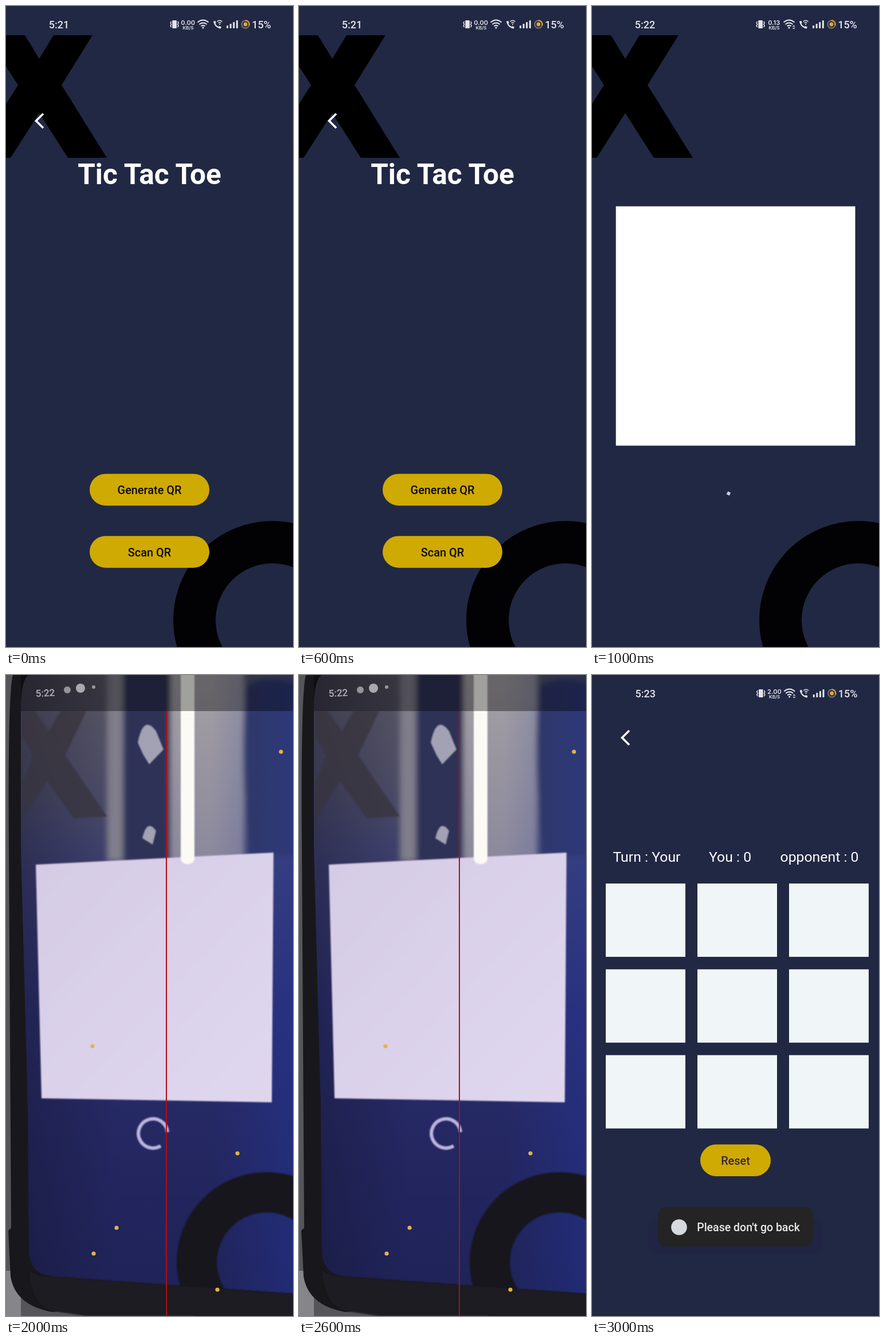
An HTML page for the animation above (4000 ms loop, 501x1119 px).

```html
<!DOCTYPE html>
<html lang="en">
<head>
<meta charset="utf-8">
<title>Tic Tac Toe</title>
<style>
  html, body { margin: 0; width: 100%; height: 100%; overflow: hidden; background: #212844; }
  svg { display: block; font-family: Roboto, sans-serif; }
  .line { fill: none; stroke: #e4e5ea; stroke-width: 2; }
  .mid { text-anchor: middle; }
  .rate { font-family: Inter, sans-serif; font-weight: 600; text-anchor: middle; }
</style>
</head>
<body>
<svg id="stage" width="501" height="1119" viewBox="0 0 501 1119">
  <defs>
    <linearGradient id="screen" x2="0" y2="1">
      <stop offset="0" stop-color="#5c5a64"/>
      <stop offset=".2" stop-color="#4c4c69"/>
      <stop offset=".32" stop-color="#3b3e70"/>
      <stop offset=".55" stop-color="#292d6c"/>
      <stop offset=".8" stop-color="#23265f"/>
      <stop offset="1" stop-color="#1f2358"/>
    </linearGradient>
    <linearGradient id="side">
      <stop offset="0" stop-color="#14142c" stop-opacity=".4"/>
      <stop offset=".35" stop-color="#14142c" stop-opacity="0"/>
      <stop offset=".7" stop-color="#2438a0" stop-opacity="0"/>
      <stop offset="1" stop-color="#2438a0" stop-opacity=".4"/>
    </linearGradient>
    <linearGradient id="glare" x2="0" y2="1">
      <stop offset="0" stop-color="#a5a1a4"/>
      <stop offset="1" stop-color="#8b889c"/>
    </linearGradient>
    <linearGradient id="paper" x2="1" y2="1">
      <stop offset="0" stop-color="#d5cbe5"/>
      <stop offset="1" stop-color="#e0d7ef"/>
    </linearGradient>
    <filter id="soft"><feGaussianBlur stdDeviation="5"/></filter>
    <filter id="crisp"><feGaussianBlur stdDeviation=".8"/></filter>
  </defs>
</svg>
<script>
const stage = document.getElementById('stage');
const HOLD = 1000;

const rect = (x, y, w, h, fill, r = 0) =>
  `<rect x="${x}" y="${y}" width="${w}" height="${h}" rx="${r}" fill="${fill}"/>`;
const dot = (x, y, r, fill) => `<circle cx="${x}" cy="${y}" r="${r}" fill="${fill}"/>`;
const label = (text, x, y, size, fill, weight = 400, cls = 'mid') =>
  `<text x="${x}" y="${y}" font-size="${size}" fill="${fill}" font-weight="${weight}" class="${cls}">${text}</text>`;
const line = (d, width = 2) => `<path class="line" d="${d}" style="stroke-width:${width}"/>`;
const button = (text, x, y, w, ink = '#0c0a08') =>
  rect(x, y, w, 55.5, '#cfaa03', 27.75) + label(text, x + w / 2, y + 35.3, 19.9, ink, 500);
const back = y =>
  `<path d="M65 ${y - 12.5}L52.5 ${y}L65 ${y + 12.5}" fill="none" stroke="#fff" stroke-width="3.6"/>`;

const backdrop = `
  <path d="M-35 51H33L58 92L83 51H151L97 138L176 265H108L58 187L8 265H-60L21 138Z"/>
  <circle cx="465" cy="1072" r="136" fill="none" stroke="#020204" stroke-width="74"/>`;

function statusBar(time, rate, traffic, shift = 0) {
  const ink = '#e4e5ea';
  const bars = [0, 1, 2, 3].map(i => rect(385 + i * 5.6, 34 - i * 3, 3, 5 + i * 3, ink, 1)).join('');
  return `<g transform="translate(${shift})">
    ${label(time, 92.5, 39, 18, ink, 500)}
    ${rect(290.3, 25, 7.6, 14, ink, 1)}
    ${line('M288.6 27l-1.6 2.5 1.6 2.5-1.6 2.5 1.6 2.5M299.6 27l1.6 2.5-1.6 2.5 1.6 2.5-1.6 2.5', 1.4)}
    ${label(rate, 317.7, 33, 11, ink, 600, 'rate')}
    ${label('KB/S', 318, 41, 8, ink, 600, 'rate')}
    ${line('M334.5 28.5Q344 20.5 353.5 28.5M337.5 32Q344 26.8 350.5 32M340.5 35.3Q344 32.4 347.5 35.3')}
    ${dot(344, 38, 1.6, ink)}
    ${traffic ? line('M350.5 36l1.7-1.7 1.7 1.7M350.5 38l1.7 1.7 1.7-1.7', 1.2) : ''}
    ${line('M363.6 26.5C363.8 33 368 37.8 375 38', 2.2)}
    ${line('M363.8 26.5l1.2 4M371.3 36.8l4 1.2', 3.6)}
    ${line('M368.5 27.3Q373 23 377.5 27.3M370.6 29.8Q373 27.6 375.4 29.8', 1.4)}
    ${dot(373, 32, 1.1, ink)}
    ${bars}
    <circle cx="418" cy="32" r="6.6" fill="none" stroke="#77716b" stroke-width="2.2"/>
    <path d="M418 25.4A6.6 6.6 0 0 1 424.3 34" fill="none" stroke="#d69a35" stroke-width="2.2"/>
    ${dot(418, 32, 3.4, '#e3a936')}
    ${label('15%', 446, 39, 18, ink, 500)}
  </g>`;
}

const menu = () => backdrop + statusBar('5:21', '0.00', false) + back(200.5) +
  label('Tic Tac Toe', 250.5, 311, 49.5, '#fff', 700) +
  button('Generate QR', 146, 816.7, 209) + button('Scan QR', 146, 925.2, 209);

const share = () => backdrop + statusBar('5:22', '0.13', true) +
  rect(41.7, 349.7, 417.8, 417.8, '#fff') +
  `<g transform="rotate(28 238.5 851)">${rect(235.7, 848.2, 5.6, 5.6, '#cfcbe8')}</g>`;

function scanner() {
  const marks = [[480, 134], [151, 648], [404, 835], [193, 965], [153, 1010], [369, 1073]];
  const screen = 'M40 0Q26 8 26 60V300L38 750 40 1005Q42 1046 80 1050L300 1066 501 1080V0Z';
  return rect(0, 0, 501, 1119, '#55555a') + rect(0, 1040, 26, 79, '#85858a') + `
    <path d="M12 0Q3 30 5 300L9 965 4 970 8 1050Q16 1100 80 1112L140 1106 501 1119V0Z" fill="#18181c"/>
    <path d="${screen}" fill="url(#screen)"/>
    <g filter="url(#soft)">
      ${rect(176, -20, 28, 345, '#807e8b')}
      ${rect(205, -20, 82, 350, '#2d3056')}
      ${rect(287, -20, 129, 345, 'url(#glare)')}
      <path d="M418 20Q460-5 515 20V315H425Q408 180 418 20Z" fill="#30375f"/>
    </g>
    <path d="${screen}" fill="url(#side)"/>
    <g filter="url(#crisp)">
      <path d="M230 118Q240 68 262 98L275 130 250 156 240 140ZM238 285Q246 250 262 272L256 296Z" fill="#a3a1b4"/>
      <path d="M28 63H50L75 98 95 63H140L103 140 176 247 118 250 72 185 29 250V190L47 140 28 105Z" fill="#38363f" opacity=".8"/>
      <circle cx="455" cy="1025" r="122" fill="none" stroke="#16161c" stroke-width="70"/>
      <path d="M40 1040Q55 1050 80 1050L300 1066 501 1080V1119H140L80 1110Q45 1100 40 1040Z" fill="#1b1b20"/>
      <path d="M52 331L467 310 464 746 62 739Z" fill="url(#paper)"/>
      ${rect(305, -20, 24, 350, '#fbfaf5', 10)}
      <path d="M282 798A25.5 25.5 0 1 0 270 822" fill="none" stroke="#bcb6df" stroke-width="6"/>
    </g>
    ${rect(26, 0, 475, 63, 'rgba(0,0,0,.36)')}
    <g transform="rotate(-3 68 32)">${label('5:22', 68.5, 37.5, 17, '#b5b3b8', 500)}</g>
    ${dot(107, 26, 6, '#96949b')}${dot(130, 23, 8, '#aaa8af')}${dot(153, 21, 3, '#99979e')}
    ${rect(279, 63, 2, 1056, '#b10c14')}` +
    marks.map(([x, y]) => dot(x, y, 3.6, '#dfb54b')).join('');
}

function game() {
  let cells = '';
  for (let i = 0; i < 9; i++)
    cells += rect(24 + i % 3 * 160, 364 + Math.floor(i / 3) * 149.8, 139, 128, '#f0f5f8');
  return statusBar('5:23', '2.00', true, .7) + back(109.5) +
    label('Turn : Your', 95.5, 326, 24.8, '#fff') +
    label('You : 0', 241, 326, 24.8, '#fff') +
    label('opponent : 0', 397, 326, 24.8, '#fff') +
    cells + button('Reset', 189, 819.5, 123, '#35264a') +
    rect(98, 950, 305, 59, 'rgba(25,30,62,.25)', 10) +
    rect(115, 929, 271, 69, '#242425', 13) + dot(152, 964, 13.8, '#d6dade') +
    label("Please don't go back", 273, 971, 19.5, '#e9e9e9', 500);
}

const scenes = [menu, share, scanner, game].map(draw => {
  const group = document.createElementNS(stage.namespaceURI, 'g');
  group.innerHTML = rect(0, 0, 501, 1119, '#212844') + draw();
  return stage.appendChild(group);
});

const start = performance.now();
function render() {
  const current = Math.floor((performance.now() - start) / HOLD) % scenes.length;
  scenes.forEach((scene, i) => scene.style.display = i === current ? '' : 'none');
  requestAnimationFrame(render);
}
render();
</script>
</body>
</html>
```
